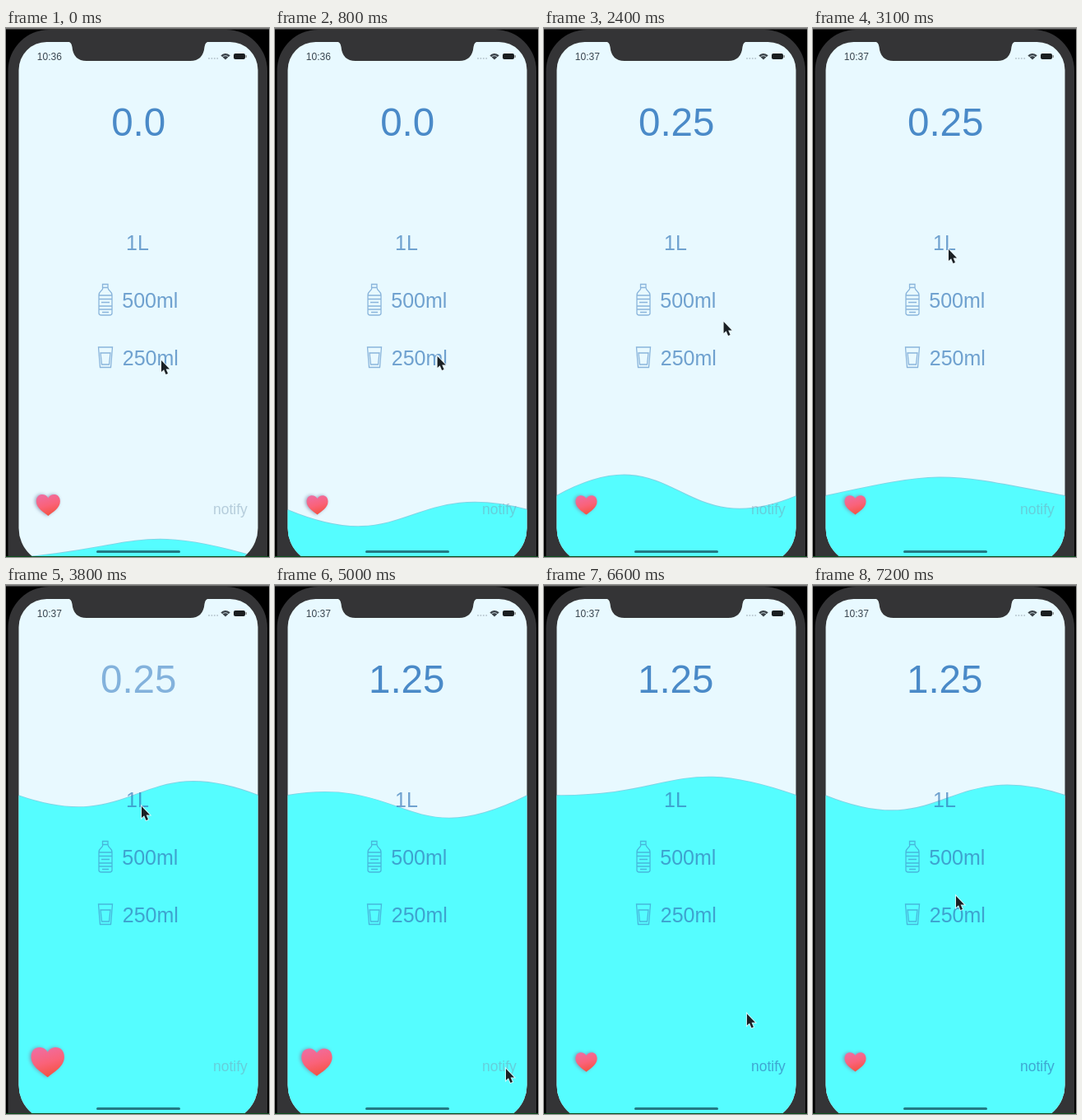
Write an HTML page with a canvas that moves like this. It is 320 px wide and 643 px high and loops after 7.3 s.

```html
<!DOCTYPE html>
<html lang="en">
<head>
<meta charset="utf-8">
<style>
  html, body { margin: 0; width: 100%; height: 100%; overflow: hidden; background: #000; }
  canvas { display: block; }
</style>
</head>
<body>
<canvas id="stage" width="320" height="643"></canvas>
<script>
const ctx = document.getElementById('stage').getContext('2d');
const LOOP = 7.3;
const BLUE = 'rgba(50,118,184,.67)';

const ramp = (t, from, to) => {
  const p = Math.min(1, Math.max(0, (t - from) / (to - from)));
  return p * p * (3 - 2 * p);
};
const mix = (a, b, p) => a + (b - a) * p;

function roundRect(x, y, w, h, r, color) {
  ctx.beginPath();
  ctx.roundRect(x, y, w, h, r);
  ctx.fillStyle = color;
  ctx.fill();
}

// Centres the visible ink of the string on x.
function text(str, x, y, size, color) {
  ctx.font = `${size}px "Liberation Sans", Arial, sans-serif`;
  ctx.fillStyle = color;
  const ink = ctx.measureText(str);
  ctx.fillText(str, x - (ink.actualBoundingBoxRight - ink.actualBoundingBoxLeft) / 2, y);
}

function drawPhone() {
  ctx.fillStyle = '#000';
  ctx.fillRect(0, 0, 320, 643);
  ctx.fillStyle = '#777';
  ctx.fillRect(0, 0, 320, 1.5);
  roundRect(2.5, 2, 315.5, 690, [50, 50, 0, 0], '#343436');
}

function drawNotch() {
  ctx.beginPath();
  ctx.moveTo(74, 16);
  ctx.quadraticCurveTo(80, 17, 80.5, 23);
  ctx.quadraticCurveTo(82, 40, 98, 40);
  ctx.lineTo(224, 40);
  ctx.quadraticCurveTo(240, 40, 241.5, 23);
  ctx.quadraticCurveTo(242, 17, 248, 16);
  ctx.fillStyle = '#343436';
  ctx.fill();
}

function drawStatus(t) {
  text(t < 2.4 ? '10:36' : '10:37', 53, 38.5, 12, '#3a4650');
  for (let i = 0; i < 4; i++) roundRect(246 + i * 3.4, 36, 2, 2, 1, '#b9c8d0');
  ctx.fillStyle = '#3a4248';
  ctx.beginPath();
  ctx.moveTo(267, 38.5);
  ctx.arc(267, 38.5, 7.5, -Math.PI * .77, -Math.PI * .23);
  ctx.fill();
  ctx.strokeStyle = '#e8f9ff';
  ctx.lineWidth = .8;
  ctx.beginPath();
  ctx.arc(267, 38.5, 4.8, -2.5, -.6);
  ctx.stroke();
  roundRect(277, 31, 14, 7, 2, '#1a1e20');
  roundRect(291.5, 33, 1.3, 3, .6, '#777');
}

function drawWater(t) {
  const level = 644 - 75 * ramp(t, .35, 1) - 313 * ramp(t, 3.12, 3.76);
  const swing = peak => 71 * Math.cos((t - peak) / 3.25 * 2 * Math.PI);
  ctx.beginPath();
  ctx.moveTo(15, level);
  ctx.bezierCurveTo(161, level - 10 + swing(.83), 161, level + 10 + swing(2), 307, level);
  ctx.strokeStyle = 'rgba(60,185,210,.6)';
  ctx.lineWidth = 1.8;
  ctx.stroke();
  ctx.lineTo(307, 660);
  ctx.lineTo(15, 660);
  ctx.fillStyle = '#55fdff';
  ctx.fill();
}

function drawIcons() {
  ctx.strokeStyle = 'rgba(60,125,190,.55)';
  ctx.lineWidth = 1.3;
  ctx.stroke(new Path2D(
    'M117.5 311.5h6.5v4h-6.5zM118 315.5c0 4-5 4-5 9v22q0 2.5 3 2.5h10q3 0 3-2.5v-22c0-5-5-5-5-9' +
    'M113 325h16M113 329.5h16M116 333.5h10M113 338h16M113 342h16M117 345.5h8'));
  ctx.stroke(new Path2D('M112.5 388h17l-2 24.5h-13zM115 395h12l-1.5 14h-9z'));
}

function drawHeart(t) {
  const phase = (t + .3) % 1.23 - .5;
  const pulse = Math.abs(phase) < .27 ? Math.cos(phase / .27 * Math.PI / 2) ** 2 : 0;
  const scale = (26 + 19 * pulse) / 28;
  ctx.save();
  ctx.translate(51.5 - pulse, 579.5);
  ctx.scale(scale, scale);
  const fill = ctx.createLinearGradient(-4, -12, 3, 13);
  fill.addColorStop(0, '#ef6da0');
  fill.addColorStop(.5, '#fa6279');
  fill.addColorStop(1, '#f4513e');
  ctx.fillStyle = fill;
  ctx.shadowColor = 'rgba(125,140,170,.8)';
  ctx.shadowBlur = 4;
  ctx.shadowOffsetX = -1.5;
  ctx.fill(new Path2D('M0-8C-3-14-14-14-14-4C-14 4-5 9 0 13C5 9 14 4 14-4C14-14 3-14 0-8z'));
  ctx.restore();
}

function drawLabels(t) {
  const totals = [['0.0', -1, .95], ['0.25', 1.05, 3.72], ['1.25', 3.9, 9]];
  for (const [value, start, end] of totals) {
    ctx.globalAlpha = ramp(t, start, start + .2) * (1 - ramp(t, end, end + .2));
    text(value, 161, 131, 47.5, '#4a8ac8');
  }
  ctx.globalAlpha = 1;
  text('1L', 160.5, 270, 25, BLUE);
  text('500ml', 175, 340, 25, BLUE);
  text('250ml', 175.5, 410, 25, BLUE);
  const on = ramp(t, 5.2, 5.5);
  const [r, g, b, a] = [[120, 48], [150, 110], [175, 180], [.45, .6]].map(([x, y]) => mix(x, y, on));
  text('notify', 273.5, 591, 17.5, `rgba(${r},${g},${b},${a})`);
}

function drawCursor(t) {
  const moves = [[.6, 1.3, 232, 379], [2.2, 2.9, 165, 269], [4.1, 4.8, 281, 588], [6.3, 7.1, 174, 378]];
  let x = 189, y = 404;
  for (const [from, to, toX, toY] of moves) {
    const p = ramp(t, from, to);
    x = mix(x, toX, p);
    y = mix(y, toY, p);
  }
  ctx.save();
  ctx.translate(x, y);
  const arrow = new Path2D('M0 0V14L3.1 11.2L5.5 17L8 16L5.6 10.5H10z');
  ctx.strokeStyle = 'rgba(235,245,250,.8)';
  ctx.lineWidth = 2;
  ctx.stroke(arrow);
  ctx.fillStyle = '#1a2024';
  ctx.fill(arrow);
  ctx.restore();
}

function frame(now) {
  const t = now / 1000 % LOOP;
  drawPhone();
  ctx.save();
  roundRect(15.5, 17, 291, 635, [34, 34, 44, 44], '#e8f9ff');
  ctx.clip();
  drawWater(t);
  drawStatus(t);
  drawIcons();
  drawLabels(t);
  drawHeart(t);
  roundRect(110, 635, 102, 3, 1.5, 'rgba(0,35,50,.6)');
  ctx.restore();
  drawNotch();
  ctx.fillStyle = '#0b4d1c';
  ctx.fillRect(0, 642, 320, 1);
  drawCursor(t);
  requestAnimationFrame(frame);
}
requestAnimationFrame(frame);
</script>
</body>
</html>
```
